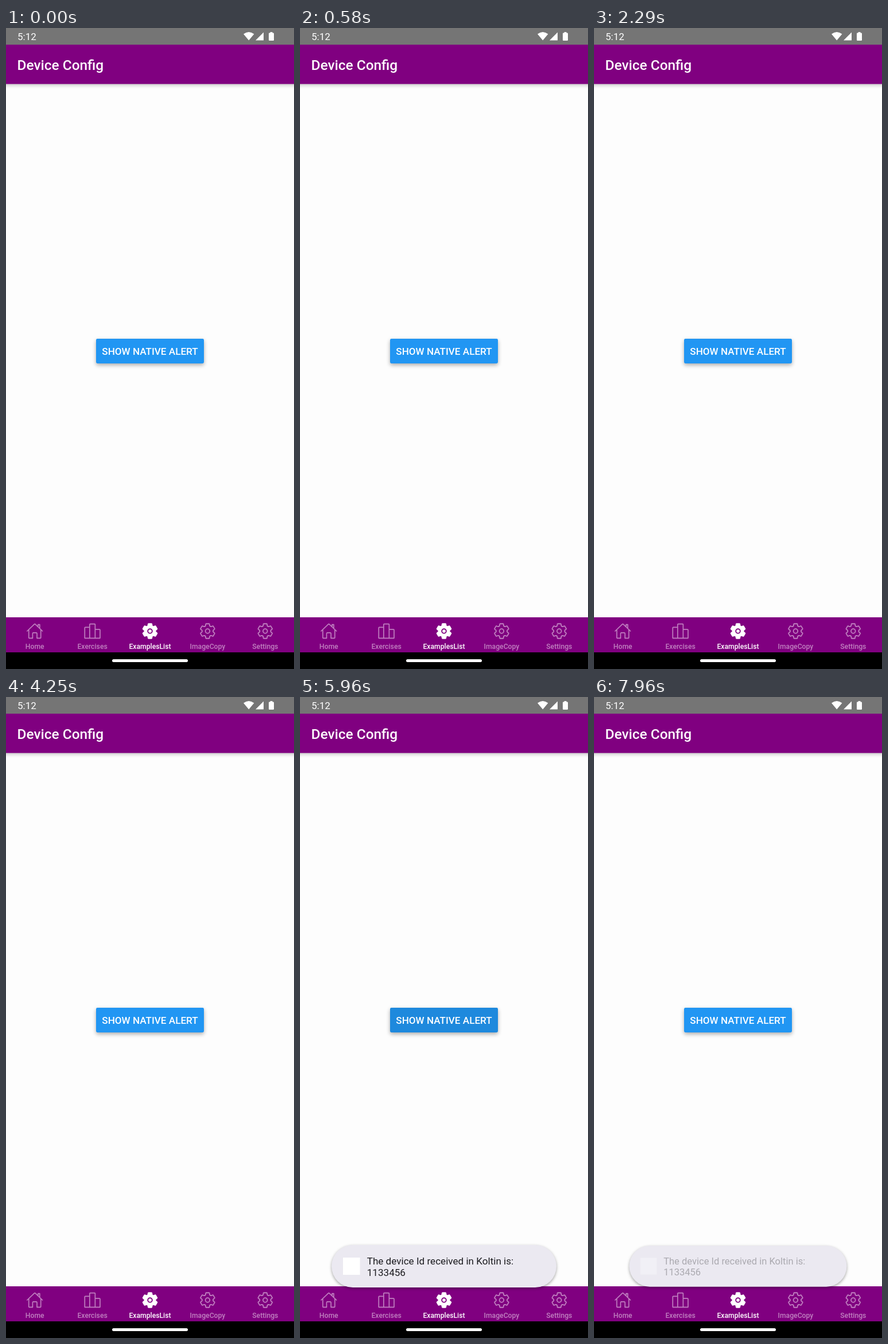
Recreate the animation shown at these times as an HTML page with a canvas. Size 502 px wide and 1116 px high, loop 8 s.

```html
<!DOCTYPE html>
<html lang="en">
<head>
<meta charset="utf-8">
<title>Device Config</title>
<style>
html, body { margin: 0; width: 100%; height: 100%; overflow: hidden; background: #fdfdfd; }
canvas { display: block; width: 502px; height: 1116px; }
</style>
</head>
<body>
<canvas id="stage" width="502" height="1116"></canvas>
<script>
const ctx = document.getElementById('stage').getContext('2d');
const LOOP = 8000, FPS = 24;
const PURPLE = '#800080', MUTED = '#c080c0', WHITE = '#fff';
const PRESS = 5450, RELEASE = 6000, TOAST_IN = 5580, TOAST_OUT = 7843;

const clamp = v => Math.max(0, Math.min(1, v));
const ramp = (t, start, length) => clamp((t - start) / length);

// Cubic bezier easing, solved by bisection
function bezier(x1, y1, x2, y2) {
  const at = (a, b, u) => 3 * a * u * (1 - u) ** 2 + 3 * b * u * u * (1 - u) + u ** 3;
  return x => {
    let lo = 0, hi = 1;
    for (let i = 0; i < 24; i++) {
      const mid = (lo + hi) / 2;
      if (at(x1, x2, mid) < x) lo = mid; else hi = mid;
    }
    return at(y1, y2, lo);
  };
}
const easeIn = bezier(0, 0, 0, 1);
const easeOut = bezier(0.3, 0, 1, 1);

function rect(x, y, w, h, color) {
  ctx.fillStyle = color;
  ctx.fillRect(x, y, w, h);
}

function pill(x, y, w, h, r, color) {
  ctx.fillStyle = color;
  ctx.beginPath();
  ctx.roundRect(x, y, w, h, r);
  ctx.fill();
}

function shadow(alpha, blur, dy) {
  ctx.shadowColor = `rgba(0,0,0,${alpha})`;
  ctx.shadowBlur = blur;
  ctx.shadowOffsetY = dy;
}

function text(str, x, y, size, color, weight = 400, align = 'left') {
  ctx.font = `${weight} ${size}px Roboto, sans-serif`;
  ctx.textAlign = align;
  ctx.fillStyle = color;
  ctx.fillText(str, x, y);
}

// Icons are drawn on a 512 unit grid
const HOME = new Path2D('M80 212v236a16 16 0 0016 16h96V328a24 24 0 0124-24h80a24 24 0 0124 24v136h96a16 16 0 0016-16V212' +
  'M480 256L267 52c-5-5-17-5-22 0L32 256M400 179V64h-48v69');
const BARS = new Path2D('M32 160v296a8 8 0 008 8h136V160a16 16 0 00-16-16H48a16 16 0 00-16 16z' +
  'M320 48H192a16 16 0 00-16 16v400h160V64a16 16 0 00-16-16z' +
  'M464 208H352a16 16 0 00-16 16v240h136a8 8 0 008-8V224a16 16 0 00-16-16z');

function makeGear() {
  const half = [[43, -214], [53.5, -205], [60, -157], [69, -145]];
  const tooth = [...half.map(([x, y]) => [-x, y]).reverse(), ...half];
  const gear = new Path2D();
  for (let k = 0; k < 6; k++) {
    const c = Math.cos(k * Math.PI / 3), s = Math.sin(k * Math.PI / 3);
    for (const [x, y] of tooth) gear.lineTo(256 + x * c - y * s, 256 + x * s + y * c);
  }
  gear.closePath();
  return gear;
}
const GEAR = makeGear();

function dot(r, color) {
  ctx.beginPath();
  ctx.arc(256, 256, r, 0, 2 * Math.PI);
  if (color) {
    ctx.fillStyle = color;
    ctx.fill();
  } else ctx.stroke();
}

function tab(label, path, i, active) {
  const x = 50.2 + i * 100.4, color = active ? WHITE : MUTED, k = 30.5 / 512;
  ctx.save();
  ctx.translate(x - 15.25, 1034.75);
  ctx.scale(k, k);
  ctx.strokeStyle = color;
  ctx.lineWidth = path === GEAR ? 30 : 28;
  ctx.lineCap = ctx.lineJoin = 'round';
  ctx.stroke(path);
  if (active) {
    ctx.fillStyle = color;
    ctx.fill(path);
    dot(80, PURPLE);
    dot(48, WHITE);
  } else if (path === GEAR) dot(64);
  ctx.restore();
  text(label, x, 1081, 12.2, color, 500, 'center');
}

function statusBar() {
  rect(0, 0, 502, 29, '#757575');
  text('5:12', 20, 20.5, 17, WHITE);
  ctx.fillStyle = WHITE;
  ctx.fill(new Path2D('M423.2 21.5L414 10.6Q423.2 3.4 432.4 10.6Z'));
  ctx.fill(new Path2D('M435 21.5L449 7.5V21.5Z'));
  pill(458, 8.5, 9, 13.5, 1.2, WHITE);
  rect(460.6, 7, 3.8, 2, WHITE);
}

function header() {
  ctx.save();
  shadow(0.22, 6, 2);
  rect(-10, 29, 522, 68.5, PURPLE);
  ctx.restore();
  text('Device Config', 19.6, 73, 24.4, WHITE, 500);
}

function button(t) {
  const press = ramp(t, PRESS, 120) * (1 - ramp(t, RELEASE, 250));
  ctx.save();
  shadow(0.32, 7, 3);
  pill(157, 541, 188, 43, 2.4, '#2196f3');
  ctx.restore();
  pill(157, 541, 188, 43, 2.4, `rgba(0,0,0,${0.09 * press})`);
  text('SHOW NATIVE ALERT', 251, 569, 17.1, WHITE, 500, 'center');
}

function tabBar() {
  rect(0, 1026, 502, 61, PURPLE);
  rect(0, 1087, 502, 29, '#000');
  pill(185, 1099, 132, 5, 2.5, WHITE);
  tab('Home', HOME, 0);
  tab('Exercises', BARS, 1);
  tab('ExamplesList', GEAR, 2, true);
  tab('ImageCopy', GEAR, 3);
  tab('Settings', GEAR, 4);
}

function toast(t) {
  if (t < TOAST_IN) return;
  const leave = easeOut(ramp(t, TOAST_OUT, 250));
  const scale = 0.9 + 0.1 * easeIn(ramp(t, TOAST_IN, 333)) - 0.1 * leave;
  const body = ramp(t, TOAST_IN, 66);
  const ink = ramp(t, TOAST_IN + 50, 283) * (1 - ramp(t, TOAST_OUT, 166));
  ctx.save();
  ctx.translate(251, 991);
  ctx.scale(scale, scale);
  ctx.translate(-251, -991);
  ctx.globalAlpha = body;
  ctx.save();
  shadow(0.35, 5, 2);
  pill(55, 954, 392, 74, 37, '#ebe9f1');
  ctx.restore();
  ctx.globalAlpha = body * ink;
  rect(75, 976, 29.5, 30, WHITE);
  text('The device Id received in Koltin is:', 116.7, 988, 17.1, '#1b1b1f');
  text('1133456', 116.7, 1008, 17.1, '#1b1b1f');
  ctx.restore();
}

function draw(t) {
  rect(0, 0, 502, 1116, '#fdfdfd');
  header();
  statusBar();
  button(t);
  tabBar();
  toast(t);
}

const start = performance.now();
function tick() {
  const t = (performance.now() - start) % LOOP;
  draw(Math.floor((t + 2) * FPS / 1000) * 1000 / FPS);
  requestAnimationFrame(tick);
}
tick();
</script>
</body>
</html>
```
